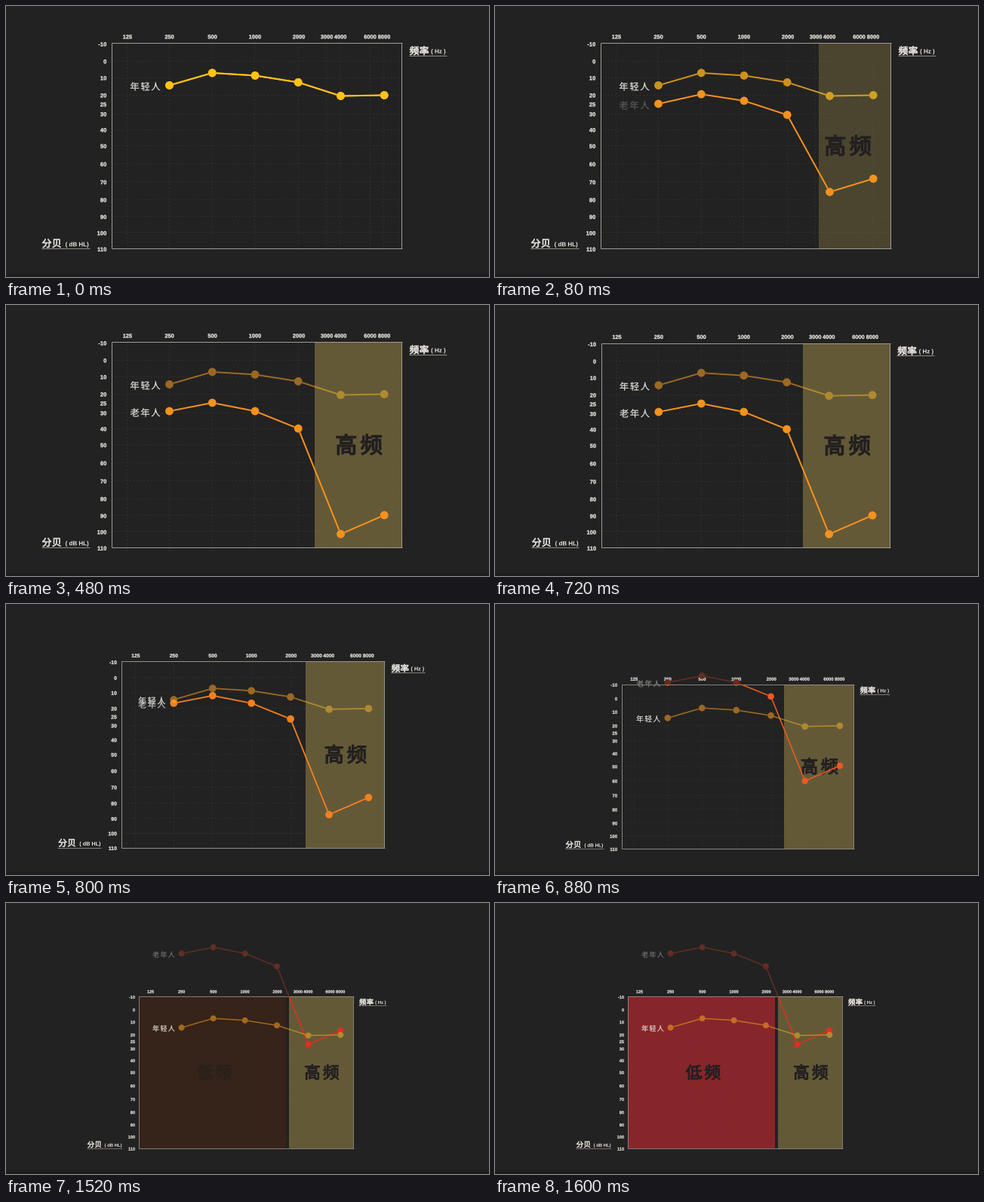
These frames come from a looping animation (640 px wide and 360 px high, 2000 ms). A matplotlib script:

```python
import numpy as np
import matplotlib.pyplot as plt
from matplotlib.animation import FuncAnimation
from matplotlib.colors import to_rgb
from matplotlib.patches import Circle, PathPatch, Rectangle
from matplotlib.path import Path
from matplotlib.textpath import TextPath
from matplotlib.transforms import Affine2D

W, H, DPI = 640, 360, 100
STEP_MS, FRAMES = 80, 25
PX = 72 / DPI

BG, WHITE, AXIS, GRID = "#222222", "#e6e3dc", "#a09c95", "#3e3d3b"
RULE = "#938c85"
YELLOW, AMBER, GOLD = "#ffc318", "#fca024", "#ebb128"
ORANGE, RED, FADED = "#f6921e", "#e42d23", "#622e24"
OLIVE, EMBER, CRIMSON, INK = "#685d39", "#382419", "#8c272b", "#221f20"
SANS, CJK = "Liberation Sans", "Noto Sans CJK JP"

LEFT, TOP, RIGHT, BOTTOM = 140, 49.4, 524.4, 322.4
SPLIT, LOW_END = 409, 403.5

FREQ = {125: 161, 250: 216.5, 500: 273.5, 1000: 330, 2000: 388,
        3000: 425, 4000: 443, 6000: 482.5, 8000: 501}
LEVEL = {-10: 50.5, 0: 73.5, 10: 95.5, 20: 118.5, 25: 130.5, 30: 143.5,
         40: 164.5, 50: 186, 60: 210, 70: 234, 80: 257.5, 90: 280,
         100: 301.5, 110: 323}

XS = np.array([216.5, 273.3, 330, 387.2, 443.5, 501.2])
YOUNG = np.array([105.4, 88.9, 92.4, 101.4, 119.5, 118.5])
OLD = np.array([141, 129.9, 141, 164.1, 304.3, 279.2])
LIFT = 168.6

ZOOM_START = 8
ZOOM = [0, 0.02, 0.36, 0.765, 0.93, 0.985, 1]
RISE = [0, 0, 0.18, 0.56, 0.84, 0.97, 1]

fig = plt.figure(figsize=(W / DPI, H / DPI), dpi=DPI, facecolor=BG)
ax = fig.add_axes([0, 0, 1, 1])


def mix(a, b, t):
    return tuple((1 - t) * np.array(to_rgb(a)) + t * np.array(to_rgb(b)))


def ease_out(t, power):
    return 1 - (1 - min(t, 1)) ** power


class Chart:
    """Draws in chart units through the current zoom."""

    def __init__(self, zoom):
        self.scale = 1 - 0.26 * zoom
        self.view = (Affine2D().translate(-140, -50).scale(self.scale)
                     .translate(140 + 36 * zoom, 50 + 74.5 * zoom)
                     + ax.transData)
        self.order = 0

    def add(self, patch, clip=None):
        self.order += 1
        patch.set_transform(self.view)
        patch.set_zorder(self.order)
        ax.add_patch(patch)
        if clip is not None:
            patch.set_clip_path(clip, self.view)

    def rect(self, x0, y0, x1, y1, color, alpha=1.0):
        self.add(Rectangle((x0, y0), x1 - x0, y1 - y0, fc=color, lw=0,
                           alpha=alpha))

    def line(self, a, b, color, width=1.0, alpha=1.0, dash="-", clip=None):
        self.add(PathPatch(Path([a, b]), fc="none", ec=color, alpha=alpha,
                           lw=width * self.scale * PX, ls=dash,
                           capstyle="butt"), clip)

    def text(self, s, x, y, size, color=WHITE, stroke=0.3, ha="center",
             font=SANS, weight="bold"):
        path = TextPath((0, 0), s, size=size,
                        prop={"family": font, "weight": weight})
        box = path.get_extents()
        anchor = {"left": box.x0, "center": (box.x0 + box.x1) / 2,
                  "right": box.x1}[ha]
        place = (Affine2D().translate(-anchor, -(box.y0 + box.y1) / 2)
                 .scale(1, -1).translate(x, y))
        self.add(PathPatch(place.transform_path(path), fc=color, ec=color,
                           lw=stroke * self.scale * PX))

    def hanzi(self, s, x, y, size, pitch, color=WHITE, stroke=0.2):
        for i, char in enumerate(s):
            self.text(char, x + (i - (len(s) - 1) / 2) * pitch, y, size,
                      color, stroke, font=CJK, weight="normal")

    def curve(self, ys, color, alpha=1.0, clip=None, r=5.4):
        pts = np.column_stack([XS, ys])
        for a, b in zip(pts[:-1], pts[1:]):
            # stop at the dots so translucent parts do not overlap
            gap = (b - a) / np.hypot(*(b - a)) * r
            self.line(a + gap, b - gap, color, 2, alpha, clip=clip)
        for p in pts:
            self.add(Circle(p, r, fc=color, lw=0, alpha=alpha), clip)


def area(x0, y0, x1, y1):
    return Path([(x0, y0), (x1, y0), (x1, y1), (x0, y1), (x0, y0)])


def draw_grid(chart):
    dots = (0, (1.2, 4))
    for x in FREQ.values():
        chart.line((x - 0.6, TOP), (x - 0.6, BOTTOM), GRID, 0.9, dash=dots)
    for level, y in LEVEL.items():
        if level == 100:
            chart.line((LEFT, y - 1.2), (RIGHT, y - 1.2), "#352d28", 0.9)
        elif level not in (-10, 25, 110):
            chart.line((LEFT, y - 1), (RIGHT, y - 1), GRID, 0.9, dash=dots)


def draw_axes(chart):
    for y in (TOP, BOTTOM):
        chart.line((LEFT, y), (RIGHT + 0.5, y), AXIS)
    for x in (LEFT, RIGHT):
        chart.line((x, TOP), (x, BOTTOM), AXIS)
    for hz, x in FREQ.items():
        chart.text(str(hz), x, 40.9, 7.4)
    for level, y in LEVEL.items():
        chart.text(str(level), 133, y + 0.3, 7.6, ha="right")
    chart.hanzi("频率", 547.5, 59.2, 12.8, 13, stroke=0.7)
    chart.text("( Hz )", 563.5, 60.8, 8, ha="left", stroke=0)
    chart.line((533.5, 66), (583.5, 66), RULE)
    chart.hanzi("分贝", 60.5, 315.3, 12.8, 13, stroke=0.7)
    chart.text("( dB HL)", 79, 317.2, 8, ha="left", stroke=0)
    chart.line((46.5, 322.4), (110.5, 322.4), RULE)


def draw(k):
    ax.cla()
    ax.set(xlim=(0, W), ylim=(H, 0))
    ax.axis("off")
    ax.add_patch(Rectangle((0, 356), W, 4, fc="#1e1d1d", lw=0))

    step = min(max(k - ZOOM_START, 0), 6)
    rise = RISE[step]
    chart = Chart(ZOOM[step])
    draw_grid(chart)

    if k >= 1:
        edge = RIGHT - (RIGHT - SPLIT) * ease_out(k / 7, 11.5)
        chart.rect(edge, TOP, RIGHT, BOTTOM, OLIVE, 0.6 if k == 1 else 0.95)
        chart.hanzi("高频", 467.5, 185.3, 29.5, 33.5, INK, 1.5)
    if k >= 19:
        first = k == 19
        chart.rect(LEFT, TOP, LOW_END, BOTTOM, EMBER if first else CRIMSON,
                   0.95)
        chart.hanzi("低频", 275, 185.3, 29.5, 33.5,
                    "#29211d" if first else INK, 1.5)

    draw_axes(chart)

    old = YOUNG + (OLD - YOUNG) * ease_out(k / 7, 7.6) - LIFT * rise
    chart.curve(old, FADED, clip=area(0, -200, W, TOP))
    chart.curve(old, mix(ORANGE, RED, rise), clip=area(0, TOP, W, 400))

    dim = min(k / 2, 1)
    for tone, x0, x1 in ((AMBER, 0, SPLIT), (GOLD, SPLIT, W)):
        chart.curve(YOUNG, mix(YELLOW, tone, dim), 1 - 0.44 * dim,
                    clip=area(x0, 0, x1, H))
    chart.hanzi("年轻人", 184.5, 106.8, 12.3, 14)
    if k >= 1:
        shown = min(k / 3.5, 1) * (1 - 0.57 * min(1.5 * rise, 1))
        chart.hanzi("老年人", 184.5, old[0] + 1.8, 12.3, 14,
                    mix(BG, WHITE, shown))


anim = FuncAnimation(fig, draw, frames=FRAMES, interval=STEP_MS,
                     repeat=True, repeat_delay=0)
plt.show()
```
